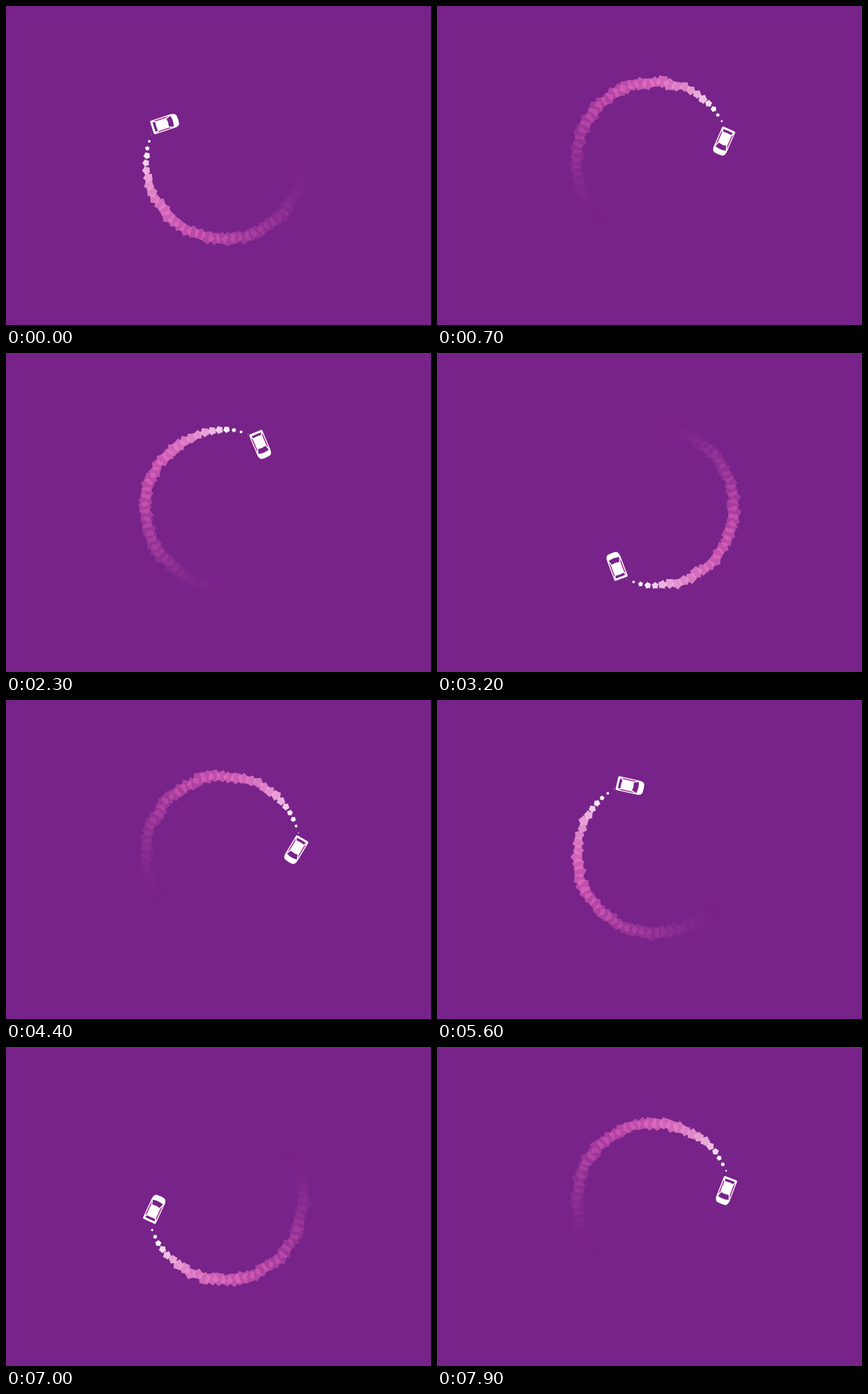
These frames come from a looping animation (600 px wide and 450 px high, 8000 ms). An HTML page:

```html
<!DOCTYPE html>
<html lang="en">
<head>
<meta charset="utf-8">
<title>Drifting car</title>
<style>
  html, body { margin: 0; width: 100%; height: 100%; overflow: hidden; background: #772389; }
  svg { display: block; width: 100vw; height: 100vh; }
</style>
</head>
<body>
<svg viewBox="0 0 600 450">
  <rect width="600" height="450" fill="#772389"/>
  <g id="smoke"></g>
  <g id="car">
    <path fill="#fff" d="M-17.5-10H12Q18-9.5 19-6Q20 0 19 6Q18 9.5 12 10H-17.5Q-19.3 10-19.3 8V-8Q-19.3-10-17.5-10Z"/>
    <g fill="#772389">
      <path d="M4-5.6L10.5-8Q13 0 10.5 8L4 5.6Q5.5 0 4-5.6Z"/>
      <path d="M-16-7.4L-12.6-6Q-13.4 0-12.6 6L-16 7.4Q-16.8 0-16-7.4Z"/>
    </g>
    <path fill="#a92d8f" d="M-14.5-8.7H8.5L3.5-7.1H-11ZM-14.5 8.7H8.5L3.5 7.1H-11Z"/>
  </g>
</svg>
<script>
const LOOP = 8000, STEP = 100;
const CENTER = { x: 308, y: 218 };
const SMOKE_LAG = 11, SPACING = 5.4, TRAIL = 205;
const WHITE = [255, 255, 255], PINK = [226, 92, 186];

// The car's speed varies a little: [time, orbit angle clockwise in degrees]
const drive = [
  [0, 212], [1400, 477], [3200, 843.5], [4400, 1076.5],
  [5600, 1330], [7000, 1614], [7900, 1791.5]
];

const car = document.getElementById("car");
const smoke = document.getElementById("smoke");

const mix = (a, b, u) => a + (b - a) * u;
const clamp = v => Math.max(0, Math.min(1, v));
const smooth = u => u * u * (3 - 2 * u);
// Rises from 0 towards 1
const approach = (age, scale) => 1 - Math.exp(-Math.max(0, age) / scale);

function random(seed) {
  const v = Math.sin(seed * 12.9898 + 4.1) * 43758.5453;
  return v - Math.floor(v);
}

function polar(radius, degrees) {
  const a = degrees * Math.PI / 180;
  return { x: radius * Math.cos(a), y: radius * Math.sin(a) };
}

function place(node, radius, degrees, rest) {
  const p = polar(radius, degrees);
  node.setAttribute("transform", `translate(${CENTER.x + p.x} ${CENTER.y + p.y}) ${rest}`);
}

function orbitAt(time) {
  const next = Math.max(1, drive.findIndex(([t]) => t >= time));
  const [t0, a0] = drive[next - 1], [t1, a1] = drive[next];
  return mix(a0, a1, (time - t0) / (t1 - t0));
}

const star = Array.from({ length: 10 }, (_, i) => {
  const p = polar(i % 2 ? 0.74 : 0.97, i * 36);
  return `${p.x.toFixed(3)},${p.y.toFixed(3)}`;
}).join(" ");

const puffs = Array.from({ length: Math.ceil(TRAIL / SPACING) }, () => {
  const puff = document.createElementNS("http://www.w3.org/2000/svg", "polygon");
  puff.setAttribute("points", star);
  smoke.prepend(puff);
  return puff;
});

// Age is how far, in degrees, the trail's head has moved past the puff
function drawPuff(puff, id, head) {
  const angle = id * SPACING, age = head - angle;
  const size = 0.2 + 10.8 * approach(age, 30) * mix(0.88, 1.1, random(id));
  const radius = 109 + 2 * approach(age, 40) + (random(id + 0.37) - 0.5) * 4 * clamp(age / 40);
  const redden = approach(age - 15, 25);
  const color = WHITE.map((v, i) => Math.round(mix(v, PINK[i], redden)));
  place(puff, radius, angle, `rotate(${random(id + 0.71) * 72}) scale(${size})`);
  puff.setAttribute("fill", `rgb(${color})`);
  puff.setAttribute("fill-opacity", 1 - smooth(clamp(age / TRAIL)));
}

function draw(time) {
  const orbit = orbitAt(time);
  const radius = 101 - 2.5 * Math.cos(2 * Math.PI * time / 3500);
  const drift = 130 - 1.3 * time / 1000;
  place(car, radius, orbit, `rotate(${orbit + drift})`);

  const head = orbit - SMOKE_LAG;
  const newest = Math.floor(head / SPACING);
  puffs.forEach((puff, i) => drawPuff(puff, newest - i, head));
}

const start = performance.now();
function tick() {
  const time = (performance.now() - start) % LOOP;
  draw(Math.floor(time / STEP) * STEP);
  requestAnimationFrame(tick);
}
tick();
</script>
</body>
</html>
```
